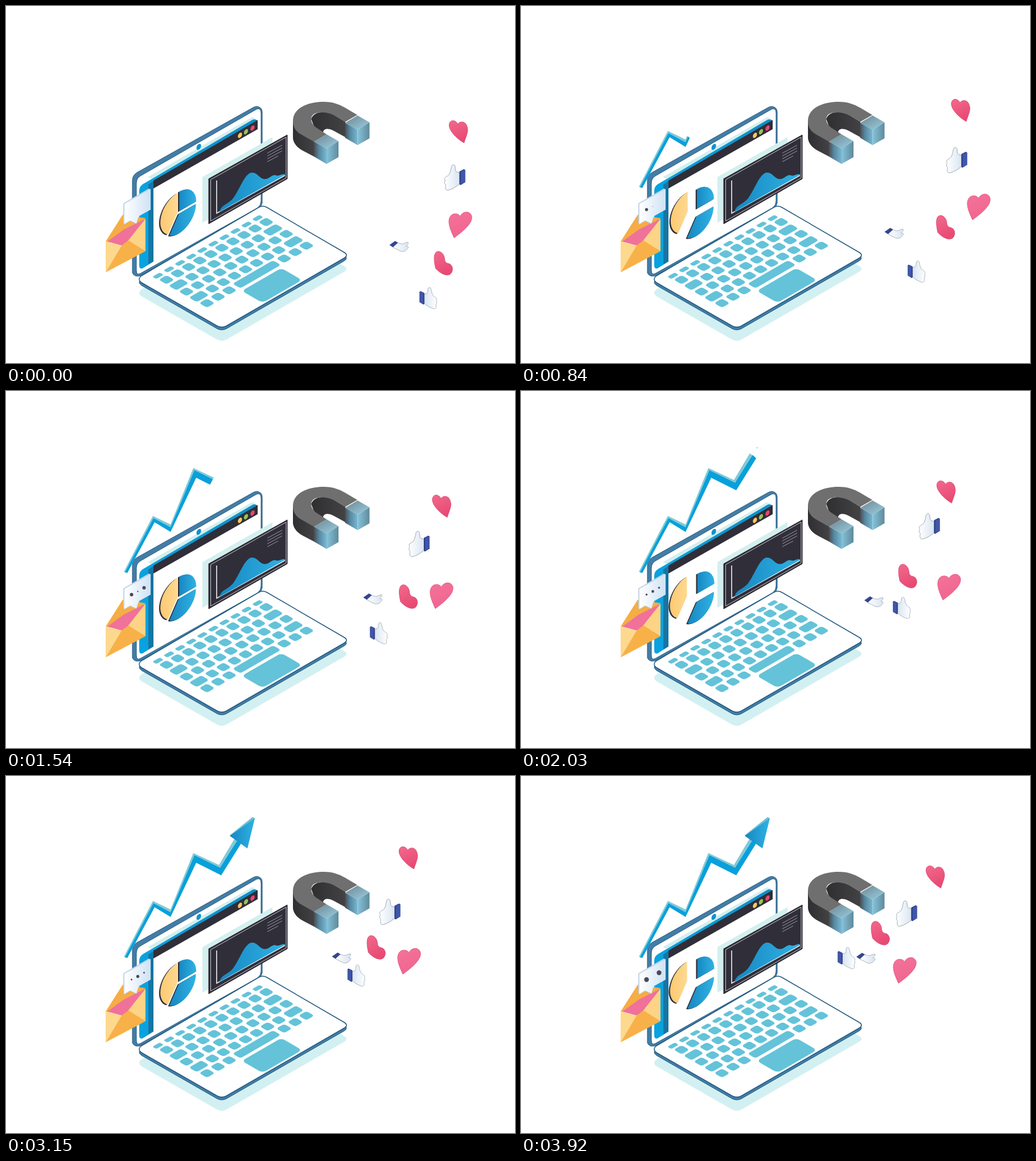
These frames come from a looping animation (894x626 px, 3990 ms). An HTML page:

```html
<!DOCTYPE html>
<html lang="en">
<head>
<meta charset="utf-8">
<title>Social magnet</title>
<style>
html, body { margin: 0; width: 100%; height: 100%; overflow: hidden; background: #fff; }
svg { display: block; width: 894px; height: 626px; }
</style>
</head>
<body>
<svg viewBox="0 0 894 626">
<defs>
  <linearGradient id="sky"><stop stop-color="#1787c2"/><stop offset="1" stop-color="#2fb2e3"/></linearGradient>
  <linearGradient id="sun"><stop stop-color="#fdc971"/><stop offset="1" stop-color="#fdd992"/></linearGradient>
  <linearGradient id="side"><stop stop-color="#08a3e0"/><stop offset="1" stop-color="#128cc6"/></linearGradient>
  <linearGradient id="paper"><stop stop-color="#fff"/><stop offset="1" stop-color="#cfe2f5"/></linearGradient>
  <linearGradient id="skin"><stop stop-color="#fff"/><stop offset="1" stop-color="#d9e5f2"/></linearGradient>
  <linearGradient id="pink" x2=".4" y2="1"><stop stop-color="#f4739b"/><stop offset="1" stop-color="#f0668f"/></linearGradient>
  <linearGradient id="rose" x2=".4" y2="1"><stop stop-color="#f26a8d"/><stop offset="1" stop-color="#e84a74"/></linearGradient>
  <linearGradient id="steel"><stop stop-color="#4a4d52"/><stop offset=".4" stop-color="#5688a1"/><stop offset="1" stop-color="#79b7d1"/></linearGradient>
  <linearGradient id="steelTop" y2="1"><stop stop-color="#6d858f"/><stop offset="1" stop-color="#9bd0e4"/></linearGradient>
  <linearGradient id="steelEnd"><stop stop-color="#86c3da"/><stop offset="1" stop-color="#5f8a9c"/></linearGradient>
  <linearGradient id="iron"><stop stop-color="#2f2f31"/><stop offset="1" stop-color="#424244"/></linearGradient>
  <mask id="reveal" maskUnits="userSpaceOnUse" x="0" y="0" width="894" height="626">
    <path id="trim" d="M209 319L259 224L289 241L331 142L376 166L408 113" fill="none" stroke="#fff" stroke-width="25"/>
  </mask>
  <path id="slab" d="M238 473L444 353Q451 349 458 353L594 432Q602 437 594 442L387 561Q379 565 371 561L238 485Q230 479 238 473Z"/>
  <g id="thumb">
    <path d="M8-9L3-10C-1-13 2-20-1-22C-6-24-6-19-7-15C-8-9-10-5-13-3C-18-1-19 2-17 5C-19 8-18 11-16 13C-18 18-16 23-12 22C-4 20 2 16 8 11Z" fill="url(#skin)" stroke="#9da6b2"/>
    <path d="M8-11L16-15L18-13V8L10 13L8 12Z" fill="#2b3c86"/>
    <path d="M10-11L18-14V8L10 12Z" fill="#4056a8"/>
  </g>
</defs>

<!-- laptop -->
<use href="#slab" y="24" fill="#d2f0f2"/>
<path d="M222 306Q222 297 230 292L434 178Q441 174 446 178Q450 180 450 187V345Q449 351 444 355L236 473Q226 476 222 468Z" fill="#437da6" stroke="#235a80"/>
<path d="M229 311Q229 302 236 298L440 181Q448 178 448 188V342Q448 349 442 354L236 469Q229 473 229 463Z" fill="#fff" stroke="#235a80"/>
<path d="M249 300L432 195L438 197V201L259 305Z" fill="#d3eeee"/>
<path d="M234 324Q234 316 241 312L432 200Q437 197 442 201L259 307V448L240 460Q234 462 234 455Z" fill="url(#side)"/>
<path d="M250 313L259 307V448L250 453Z" fill="#1675a3"/>
<path d="M259 306L442 200V216L259 320Z" fill="#302e38"/>
<g transform="matrix(.866 -.5 0 1 0 0)">
  <circle cx="391" cy="442.500" r="4.700" fill="#0e92d0"/>
  <circle cx="474.500" cy="464" r="4.200" fill="#fdc85f"/>
  <circle cx="486.700" cy="463.800" r="4.200" fill="#93c553"/>
  <circle cx="500" cy="464" r="4.200" fill="#e8476f"/>
</g>
<g id="pie"></g>
<path d="M345 300L468 230V310L345 380Z" fill="#d3efee"/>
<path d="M356 303L494 226V303L356 382Z" fill="#302e38" stroke="#25232b"/>
<path d="M359.500 304.500L492 230V301.500L359.500 377Z" fill="none" stroke="#c9c9d2"/>
<path d="M370 306V363.500L490 297" fill="none" stroke="#f1f3f6" stroke-width="1.600"/>
<path d="M375 361C378 348 389 349 399 337C411 321 419 293 432 292C443 292 446 306 458 303C466 300 468 295 474 297C480 299 484 294 490 295V296Z" fill="url(#sky)"/>
<path d="M459 258L485 244M459 263L485 249M459 268L485 254M459 273L478 263" stroke="#9a99a5"/>
<use href="#slab" y="5" fill="#437da6" stroke="#235a80"/>
<use href="#slab" y="2.500" fill="#437da6"/>
<use href="#slab" fill="#fff" stroke="#235a80" stroke-width="1.500"/>
<g id="keys" transform="matrix(.866 -.5 .866 .5 282 480)" fill="#64c3d9"></g>

<!-- envelope and speech bubble -->
<path d="M175 413L205 366L245 372L210 419Z" fill="#f5ad45"/>
<path d="M178 413L207 392L243 374L228 408L203 420Z" fill="#f0719a"/>
<path d="M175 413L203 420L175 467Z" fill="#fdd98d"/>
<path d="M245 373V430L214 412Z" fill="#fdd486"/>
<path d="M175 467L203 420L215 411L245 430Z" fill="#f8b148"/>
<path d="M206 346L251 320L254 322V357L233 369L229 382L218 377L208 383L206 381Z" fill="#c3d4e6"/>
<path d="M208 347L254 321V357L233 368L229 381L218 376L208 382Z" fill="url(#paper)"/>
<g id="dots" fill="#4b4b57"></g>

<!-- magnet -->
<path d="M536 198C541 184 561 183 576 191L596 203V230L576 219C565 213 557 215 557 222L542 214Z" fill="url(#iron)"/>
<path d="M504 200V232C505 242 513 249 522 254L541 264V237Z" fill="url(#iron)"/>
<path d="M541 238L518 225C506 218 504 209 504 200C505 179 530 168 558 168C575 168 586 173 595 178L617 191L596 203L579 193C565 185 548 184 540 190C532 197 537 208 546 214L563 225Z" fill="#6f6f70"/>
<g id="tip">
  <path d="M541 238L563 225L584 237L563 250Z" fill="url(#steelTop)"/>
  <path d="M541 238L563 250V277L541 264Z" fill="url(#steel)"/>
  <path d="M563 250L584 237V265L563 277Z" fill="url(#steelEnd)"/>
</g>
<use href="#tip" x="54.500" y="-33"/>

<!-- growth arrow -->
<g mask="url(#reveal)">
  <path d="M207 317L258 219L289 234L329 135L374 156L402 109L413 118L378 174L334 152L289 247L261 230L213 319Z" fill="#83c9d6"/>
  <path d="M209 318L259 223L289 239L331 139L376 161L407 112L413 118L378 174L334 152L289 247L261 230L213 319Z" fill="#08a0dc"/>
</g>
<g id="head">
  <path d="M393 104L433 72L437 74L424 126Z" fill="#6fbfd2"/>
  <path d="M393 105L437 74L424 127Z" fill="url(#sky)"/>
</g>

<!-- reactions -->
<g id="floaters">
  <g><path id="h1" d="M-1-13C-4-20-14-22-16-13C-18-3-4 12 10 20C13 10 18 0 16-6C14-19 3-19-1-13Z" fill="#cd426b"/><use href="#h1" style="--c:1"/></g>
  <g><use href="#thumb"/></g>
  <g><path d="M0-15C4-24 17-25 20-15C22-2 4 12-11 23C-15 14-21 2-20-8C-18-21-6-22 0-15Z" fill="url(#pink)" stroke="#df4f7d" stroke-width=".8"/></g>
  <g>
    <path d="M-3-6C3-4 6-3 9-5L15-7C18-5 14-2 12 0C17 0 17 3 14 5C12 9 7 10 3 9L-11 2Z" fill="url(#skin)" stroke="#a3abb6" stroke-width=".9"/>
    <path d="M-17-2L-7-9L-2-6L-11 2Z" fill="#33468f"/>
  </g>
  <g><path d="M2-6C2-16-6-23-12-20C-19-16-16 0-14 9C-4 20 8 24 13 18C19 10 14 2 10 1C6 0 3-1 2-6Z" fill="url(#rose)" stroke="#d8436b" stroke-width=".8"/></g>
  <g><use href="#thumb" transform="scale(-.84 .84)"/></g>
</g>
</svg>
<script>
const LOOP = 3990, STEP = 70;
const $ = id => document.getElementById(id);
const clamp = v => Math.max(0, Math.min(1, v));
const ease = v => { v = clamp(v); return v * v * (3 - 2 * v); };

function add(parent, tag, attrs) {
  const el = document.createElementNS('http://www.w3.org/2000/svg', tag);
  for (const k in attrs) el.setAttribute(k, attrs[k]);
  return parent.appendChild(el);
}

// Keyboard, in floor-plane units: a runs along a row, b across rows
function key(a, b, w = 16, h = 16, r = 4.5) {
  add($('keys'), 'rect', { x: a - w / 2, y: b - h / 2, width: w, height: h, rx: r });
}
const PITCH = 22.45;
for (let i = 0; i < 10; i++) {
  key(-1.6 + i * PITCH, -15.7, 15, 8, 3);
  key(i * PITCH, 0);
  key(i * PITCH - .5, 41);
}
for (const b of [20.5, 61.8]) {
  key(4, b, 25);
  for (let i = 0; i < 7; i++) key(31 + i * PITCH, b);
  key(195, b, 27);
}
for (const a of [0, 22.4, 44.8, 156.5, 179, 201.5]) key(a, 82);
key(100.8, 82, 82);
key(96.8, 116.8, 80, 42, 7);

// Pie slices: start and end angle, fill, rest offset, travel
const slices = [
  [124, 270, 'url(#sun)', [-1.5, 0], [-9.5, -2.5]],
  [-90, 0, 'url(#sky)', [1.8, -2.6], [5.5, -5]],
  [0, 124, 'url(#sky)', [1.2, 1.8], [5.5, 5]]
].map(([from, to, fill, rest, move]) => {
  const at = deg => [Math.cos(deg * Math.PI / 180) * 34.5, Math.sin(deg * Math.PI / 180) * 34.5].join(' ');
  const d = `M0 0L${at(from)}A34.5 34.5 0 0 1 ${at(to)}Z`;
  const el = add($('pie'), 'g', {});
  add(el, 'path', { d, fill: '#302e38', transform: 'matrix(.866 -.5 0 1 300.2 363.8)' });
  add(el, 'path', { d, fill, transform: 'matrix(.866 -.5 0 1 302.5 362.5)' });
  return { el, rest, move };
});

const dots = [[220.5, 357], [231.5, 351.5], [242.5, 345]]
  .map(([cx, cy]) => add($('dots'), 'circle', { cx, cy, r: 0 }));

// Smooth curve through values v at times ts
function curve(ts, v, t) {
  const last = ts.length - 1;
  let i = 0;
  while (i < last - 1 && t >= ts[i + 1]) i++;
  const slope = k => {
    const a = Math.max(0, k - 1), b = Math.min(last, k + 1);
    return (v[b] - v[a]) / (ts[b] - ts[a]);
  };
  const h = ts[i + 1] - ts[i], u = (t - ts[i]) / h, w = 1 - u;
  return v[i] * w * w * (1 + 2 * u) + v[i + 1] * u * u * (3 - 2 * u)
    + h * u * w * (slope(i) * w - slope(i + 1) * u);
}

function lerp(ts, v, t) {
  let i = 0;
  while (i < ts.length - 2 && t >= ts[i + 1]) i++;
  return v[i] + (v[i + 1] - v[i]) * clamp((t - ts[i]) / (ts[i + 1] - ts[i]));
}

const beats = [0, 840, 1540, 2030, 2590, 3150, 3920];
const paths = [
  { x: [794.5, 772, 765, 746.5, 722.5, 706.5, 727.5], y: [220, 182.5, 201.5, 176.5, 176.5, 143, 176.5] },
  { x: [788.5, 765.5, 726, 717.5, 685.5, 674.5, 677.5], y: [301, 270.5, 268.5, 237.5, 243, 238.5, 241.5] },
  { x: [798, 804, 765, 752, 747.5, 708, 674], y: [383.5, 352, 358.5, 343.5, 311.5, 324.5, 340.5] },
  { x: [690.5, 655.5, 644.5, 620, 609.5, 589.5, 606], y: [421, 398, 364, 369, 327, 318.5, 319] },
  { x: [768.5, 746, 707, 679.5, 657.5, 650.5, 631.5], y: [451, 388, 360.5, 324.5, 330, 300.5, 275.5] },
  { ts: [0, 560, 840, 1120, 1540, 1680, 2030, 2590, 3150, 3920],
    x: [741.5, 715, 694.5, 674, 654.5, 657, 668.5, 622, 615, 571.5],
    y: [512.5, 508, 466, 448, 425, 427, 380.5, 380.5, 350, 319.5] }
];
const floaters = [...$('floaters').children];
floaters[0].lastChild.remove();
$('h1').setAttribute('fill', 'url(#rose)');
$('h1').setAttribute('stroke', '#d8436b');
$('h1').setAttribute('stroke-width', '.8');

const move = (el, x, y) => el.setAttribute('transform', `translate(${x} ${y})`);

function draw(t) {
  floaters.forEach((el, i) => {
    const { ts = beats, x, y } = paths[i];
    move(el, curve(ts, x, t), curve(ts, y, t));
  });

  const p = t % 1575;
  const open = p < 770 ? ease(p / 420) : 1 - ease((p - 735) / 455);
  for (const s of slices) move(s.el, s.rest[0] + s.move[0] * open, s.rest[1] + s.move[1] * open);

  const swing = 2.1 * Math.cos((t - 3920) / 1095 * 2 * Math.PI);
  dots.forEach((dot, i) => {
    const grow = clamp((t - 560 - i * 140) / 300);
    dot.setAttribute('r', Math.max(0, 2.1 + (i === 1 ? -swing : swing)) * grow);
  });

  const drawn = lerp([0, 840, 1540, 2030], [0, 154, 284, 370], t);
  $('trim').setAttribute('stroke-dasharray', `${drawn} 999`);
  $('trim').setAttribute('visibility', drawn ? 'visible' : 'hidden');
  const size = clamp((t - 2010) / 490);
  $('head').setAttribute('transform', `translate(414.5 99.5) scale(${size}) translate(-414.5 -99.5)`);
}

function tick() {
  draw(Math.floor(performance.now() % LOOP / STEP) * STEP);
  requestAnimationFrame(tick);
}
tick();
</script>
</body>
</html>
```
